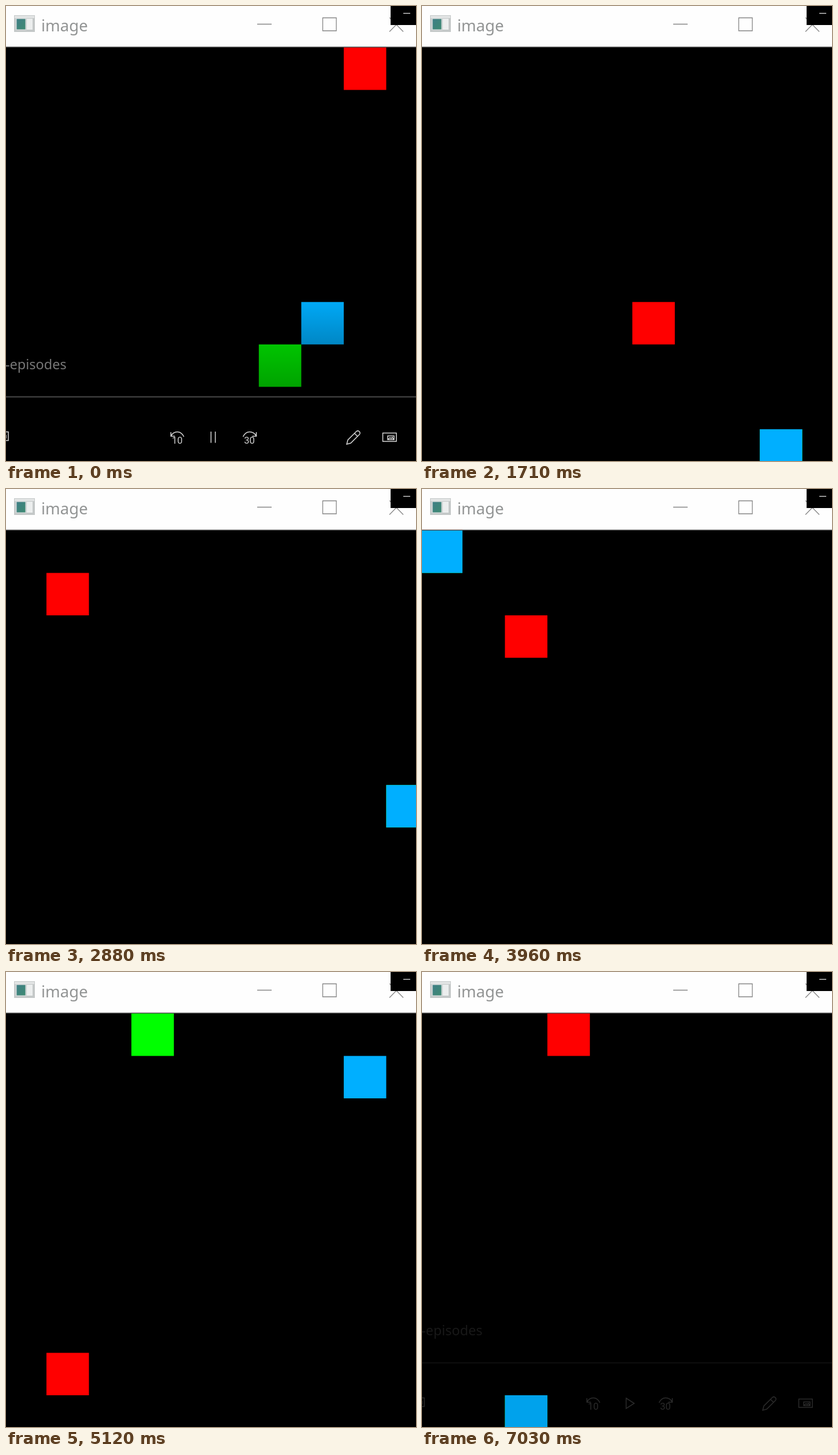
Recreate the animation shown at these times as an HTML page. Size 710 by 789 pixels, loop 7060 ms.

```html
<!DOCTYPE html>
<html lang="en">
<head>
<meta charset="utf-8">
<title>Grid agent</title>
<style>
  html, body { margin: 0; width: 100%; height: 100%; overflow: hidden; background: #000; }
  svg { display: block; width: 710px; height: 789px; }
  text { font-family: "Noto Sans", "Open Sans", sans-serif; }
  .cell { filter: blur(.45px); }
  .thin { fill: none; stroke: #858585; stroke-width: 1.3; }
  .icon { fill: none; stroke: #d8d8d8; stroke-width: 1.5; }
  .num { fill: #d0d0d0; font: 16.5px Roboto, sans-serif; text-anchor: middle; }
</style>
</head>
<body>
<svg viewBox="0 0 710 789">
  <defs>
    <linearGradient id="shade" x1="0" y1="0" x2="0" y2="1">
      <stop offset="0" stop-opacity="0"/>
      <stop offset=".3" stop-opacity=".23"/>
      <stop offset=".55" stop-opacity=".36"/>
      <stop offset="1" stop-opacity=".38"/>
    </linearGradient>
    <linearGradient id="pane" x1="0" y1="0" x2="1" y2="1">
      <stop offset="0" stop-color="#3f7f86"/>
      <stop offset="1" stop-color="#3e8a72"/>
    </linearGradient>
  </defs>

  <rect width="710" height="789"/>
  <rect width="710" height="70" fill="#fefefe"/>
  <rect y="70" width="710" height="1" fill="#a8a8a8"/>
  <rect y="71" width="710" height="1" fill="#484848"/>

  <g id="window">
    <rect x="14" y="16" width="36" height="29" fill="#c4c8c8"/>
    <rect x="15" y="17" width="34" height="4" fill="#e2e4e4"/>
    <rect x="16.500" y="21" width="19" height="21" fill="#d4d9d9"/>
    <rect x="18.500" y="22.500" width="15" height="18" fill="url(#pane)"/>
    <rect x="36" y="22" width="10" height="19" fill="#eceeee"/>
    <text x="61" y="43.500" font-size="27.500" fill="#929494">image</text>
    <path class="thin" d="M435 31.500H460M548.500 20.500H572V43H548.500ZM664 20L688 44.500M688 20L664 44.500"/>
    <rect x="666" width="44" height="33"/>
    <rect x="688" y="12" width="12" height="1.300" fill="#ddd"/>
  </g>

  <rect id="food" class="cell" fill="#0f0"/>
  <rect id="player" class="cell" fill="#00afff"/>
  <rect id="enemy" class="cell" fill="#f00"/>

  <g id="controls">
    <rect y="500" width="710" height="289" fill="url(#shade)"/>
    <text x="-1" y="630" font-size="23.500" fill="#777">-episodes</text>
    <rect y="676.500" width="710" height="2.500" fill="#3c3c3c"/>
    <path class="icon" d="M-8 738.500H4V753.500H-8M0 744V749H-4"/>
    <path class="icon" d="M285.500 739V746H292.500M286 745Q290 738.500 296.500 738.500Q304 738.500 308 747"/>
    <text class="num" x="296.500" y="759">10</text>
    <path class="icon" d="M433.500 739V746H426.500M433 745Q429 738.500 422 738.500Q414.500 738.500 410.500 747"/>
    <text class="num" x="421.500" y="759">30</text>
    <path class="icon" id="pause" d="M355 738V757.500M362.500 738V757.500"/>
    <path class="icon" id="play" d="M353.500 739L367.500 748L353.500 757Z"/>
    <path class="icon" d="M590 760L592 752.500L607 737.500Q609.500 735.500 612 738Q614 740.500 612 743L597 758ZM603.500 741L608.500 746"/>
    <path class="icon" d="M652.500 740.500H676V755H652.500ZM661 745.500H672V752H661ZM662 751L665 748.500L667 750L669 748L671 751"/>
  </g>
</svg>
<script>
const LOOP = 7060;
const PITCH = 73.55, LEFT = -3.5, TOP = 72;

// Start time, ms per move, enemy cell, food cell, player's path; a cell is column then row.
const runs = [
  [0, 60, "80", "67", "76 67"],
  [560, 55, "23", "16", "72 63 54 65 56 47 38 27 16"],
  [1530, 60, "56", "89", "67 78 89"],
  [2150, 45.7, "11", "96", "33 22 31 40 50 41 32 43 54 65 76 85 94 95 96"],
  [3330, 45, "22", "00", "76 67 58 49 39 29 18 07 16 05 04 03 02 01 00"],
  [4510, 46.9, "18", "30", "62 53 44 55 66 75 64 75 86 95 84 93 92 81"],
  [5210, 30, "18", "30", "50 40 30"],
  [5680, 56, "30", "29", "66 75 84 73"],
  [6010, 45, "30", "29", "51 40 31"],
  [6130, 36.2, "30", "29", "42 53 64 75 66 57 48 39 29"]
].map(([at, step, enemy, food, path]) => ({ at, step, enemy, food, path: path.split(" ") }));

const el = id => document.getElementById(id);
const food = el("food"), player = el("player"), enemy = el("enemy");
const controls = el("controls"), pause = el("pause"), play = el("play");

for (const box of [food, player, enemy]) {
  box.setAttribute("width", PITCH);
  box.setAttribute("height", PITCH);
}

function place(box, cell) {
  box.setAttribute("x", LEFT + PITCH * cell[0]);
  box.setAttribute("y", TOP + PITCH * cell[1]);
}

function controlsOpacity(t) {
  if (t >= 7030) return 0.2;
  return Math.max(0, Math.min(1, 1 - (t - 60) / 290));
}

function draw(t) {
  const run = runs.findLast(r => r.at <= t);
  const move = Math.min(run.path.length - 1, Math.floor((t - run.at) / run.step));
  place(food, run.food);
  place(player, run.path[move]);
  place(enemy, run.enemy);

  const ended = t >= 7030;
  controls.setAttribute("opacity", controlsOpacity(t));
  pause.setAttribute("visibility", ended ? "hidden" : "visible");
  play.setAttribute("visibility", ended ? "visible" : "hidden");
}

const start = performance.now();
function tick() {
  draw((performance.now() - start) % LOOP);
  requestAnimationFrame(tick);
}
draw(0);
requestAnimationFrame(tick);
</script>
</body>
</html>
```
